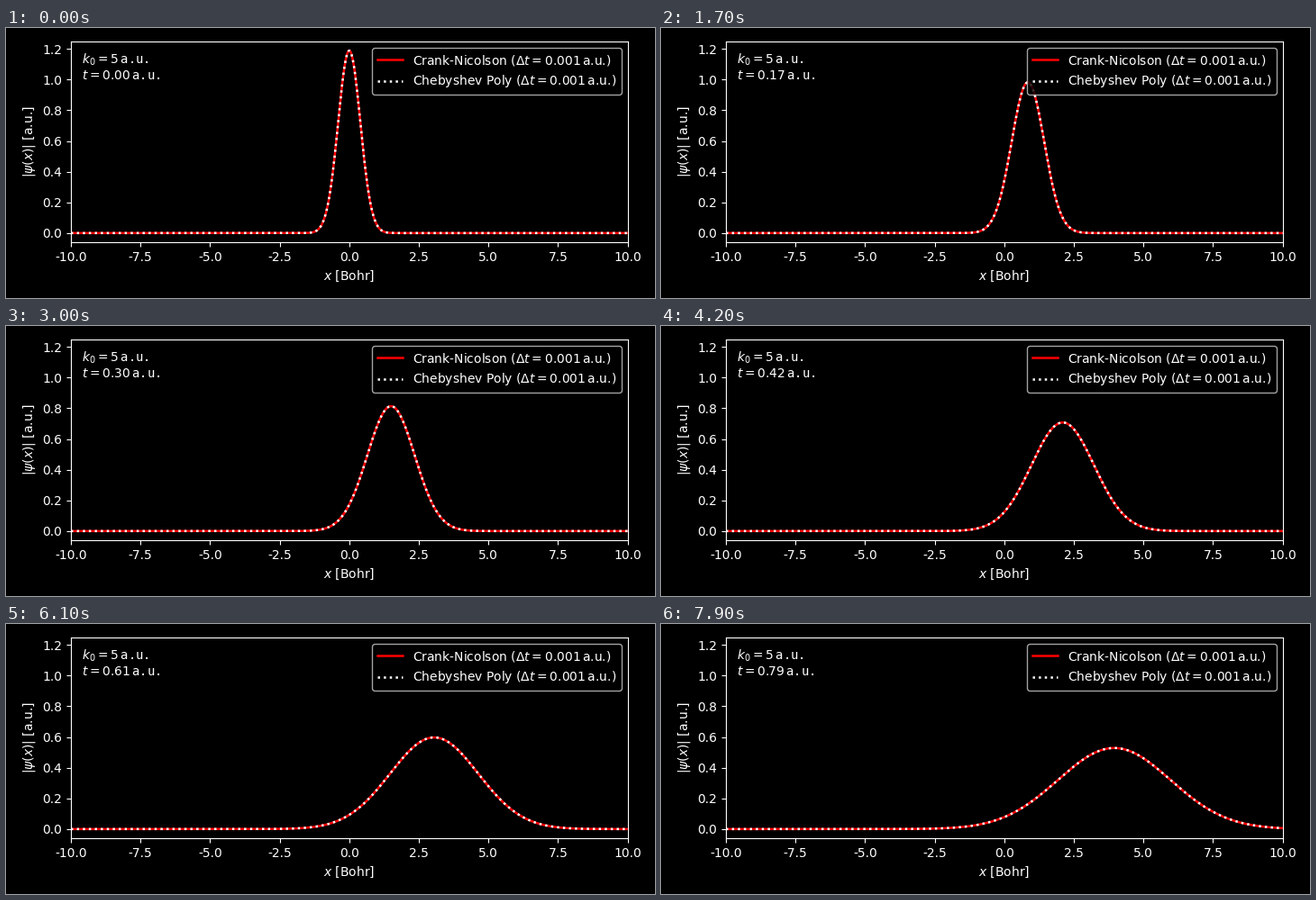
A matplotlib script for the animation above (8000 ms loop, 720 px wide and 300 px high).

```python
import numpy as np
import matplotlib.pyplot as plt
from matplotlib.animation import FuncAnimation

plt.style.use("dark_background")
plt.rcParams.update({"axes.unicode_minus": False, "font.family": "DejaVu Sans"})

FRAMES = 80
INTERVAL = 100   # ms
DT = 0.01        # a.u. per frame
K0 = 5
A = np.pi        # initial packet: exp(-A x^2)

x = np.linspace(-10, 10, 1000)


def packet(t):
    """Modulus of a freely spreading Gaussian wave packet."""
    spread = 1 + (2 * A * t) ** 2
    return (2 * A / np.pi / spread) ** 0.25 * np.exp(-A * (x - K0 * t) ** 2 / spread)


def caption(t):
    return f"$k_0={K0}\\,$a.u.\n$t={t:.2f}\\,$a.u."


fig, ax = plt.subplots(figsize=(7.2, 3), dpi=100)
step = r"($\Delta t=0.001\,$a.u.)"
solid, = ax.plot(x, packet(0), "r-", lw=1.8, label=f"Crank-Nicolson {step}")
dotted, = ax.plot(x, packet(0), "w:", lw=1.8, label=f"Chebyshev Poly {step}")
note = ax.text(0.02, 0.95, caption(0), transform=ax.transAxes,
               ha="left", va="top", family="DejaVu Sans Mono")

ax.set_xlim(-10, 10)
ax.set_ylim(-0.05 * 2 ** 0.25, 1.05 * 2 ** 0.25)
ax.set_xlabel(r"$x$ [Bohr]")
ax.set_ylabel(r"$|\psi(x)|$ [a.u.]")
ax.legend(loc="upper right")
fig.tight_layout()
fig.subplots_adjust(left=72 / 720, bottom=62 / 300)


def update(i):
    t = i * DT
    y = packet(t)
    solid.set_ydata(y)
    dotted.set_ydata(y)
    note.set_text(caption(t))
    return solid, dotted, note


anim = FuncAnimation(fig, update, frames=FRAMES, interval=INTERVAL,
                     repeat=True, repeat_delay=0)
plt.show()
```
